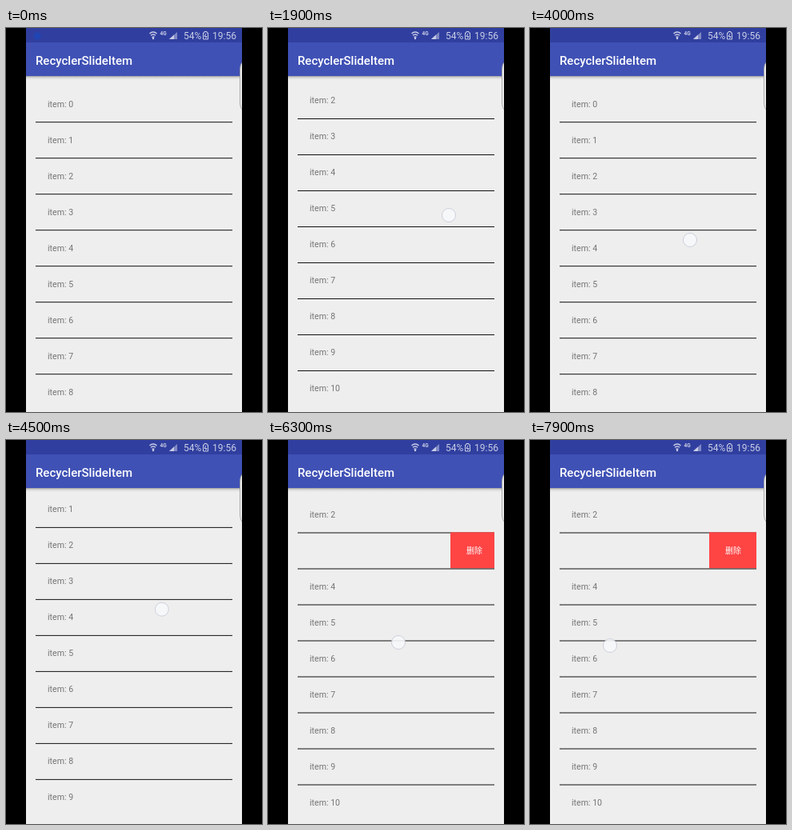
These frames come from a looping animation (320x480 px, 8 s). An HTML page:

```html
<!DOCTYPE html>
<html lang="en">
<head>
<meta charset="utf-8">
<title>Sliding list items</title>
<style>
html, body { margin: 0; width: 100%; height: 100%; overflow: hidden; background: #000; }
svg { display: block; width: 320px; height: 480px; }
text { font-family: Roboto, sans-serif; }
.label { font-size: 10.6px; fill: #757575; }
.status { font-size: 12px; fill: #c9cde6; }
.network { font-size: 6.5px; font-weight: 700; }
.delete { font: 10px "Noto Sans CJK SC", "Noto Sans CJK", sans-serif; fill: #fff; text-anchor: middle; }
</style>
</head>
<body>
<svg viewBox="0 0 320 480">
  <defs>
    <clipPath id="listClip"><rect x="37" y="72" width="246" height="396"/></clipPath>
    <clipPath id="screenClip"><rect x="25" width="270" height="480"/></clipPath>
    <linearGradient id="shade" x2="0" y2="1">
      <stop stop-color="#777" stop-opacity=".7"/>
      <stop offset=".4" stop-color="#999" stop-opacity=".3"/>
      <stop offset="1" stop-color="#bbb" stop-opacity="0"/>
    </linearGradient>
  </defs>
  <rect width="320" height="480"/>
  <g id="screen" clip-path="url(#screenClip)">
    <rect x="25" width="270" height="480" fill="#eee"/>
    <g clip-path="url(#listClip)"><g id="list"></g></g>

    <rect x="25" y="60" width="270" height="5" fill="url(#shade)"/>
    <rect x="25" y="18" width="270" height="42" fill="#3f51b5"/>
    <rect x="25" width="270" height="18" fill="#303f9f"/>
    <text x="37" y="46" font-size="15" font-weight="500" fill="#fff">RecyclerSlideItem</text>

    <circle id="notice" cx="39" cy="10" r="4.5" fill="#2146b4"/>
    <path d="M179.5 7q4.500-4 9 0M181 9.300q3-2.600 6 0M182.500 11.500q1.500-1.200 3 0" fill="none" stroke="#c9cde6" stroke-width="1.5"/>
    <circle cx="184" cy="13" r="1.2" fill="#c9cde6"/>
    <text class="status network" x="192.500" y="8.500">4G</text>
    <path d="M204 14L214 5V14Z" fill="#8089c4"/>
    <path d="M204 14L210 8.600V14Z" fill="#c9cde6"/>
    <text class="status" x="222" y="14">54%</text>
    <path d="M246.500 6H248V4.500H251V6H252.500V14H246.500ZM250 7L248 10.500H251L249.500 13" fill="none" stroke="#c9cde6"/>
    <text class="status" x="258" y="14">19:56</text>

    <path d="M296 42Q292.500 45 292.500 52V94Q292.500 100 296 103Z" fill="#eee" stroke="#999" stroke-width=".8"/>
  </g>
</svg>
<script>
const LOOP = 8000, STEP = 100, FADE = 200;
const ROW = 45, TOP = 72, RIGHT = 283, BUTTON = 60, SLIDING = 3;

// The list scrolls and the row slides by as much as the finger moves.
const gestures = [
  { start: 400, end: 1200, from: [222, 340], move: [0, -94.2], scrolls: true },
  { start: 1900, end: 2600, from: [226, 234], move: [-4, 94.2], scrolls: true },
  { start: 2940, end: 3300, from: [215, 146], move: [-2, 15] },
  { start: 4000, end: 4860, from: [200, 265], move: [-9, -91.7], scrolls: true },
  { start: 4900, end: 5300, from: [218, 152], move: [-BUTTON, 6], slides: true },
  { start: 6200, end: 6840, from: [158, 253], move: [32, 0], slides: true, springsBack: true },
  { start: 7880, end: 8520, from: [99, 257], move: [32, 0], slides: true }
];

const ramp = (time, start, end) => Math.min(1, Math.max(0, (time - start) / (end - start)));
const byId = id => document.getElementById(id);
const screen = byId("screen"), list = byId("list"), notice = byId("notice");

function add(parent, tag, attributes, content = "") {
  const node = document.createElementNS("http://www.w3.org/2000/svg", tag);
  for (const name in attributes) node.setAttribute(name, attributes[name]);
  node.textContent = content;
  return parent.appendChild(node);
}

const place = (node, x, y) => node.setAttribute("transform", `translate(${x} ${y})`);

let slidingLabel, deleteButton;
for (let i = 0; i < 13; i++) {
  const y = TOP + i * ROW, baseline = y + 26.7;
  const label = add(list, "text", { class: "label", x: 52, y: baseline }, "item: " + i);
  if (i === SLIDING) {
    slidingLabel = label;
    deleteButton = add(list, "g", {});
    add(deleteButton, "rect", { x: RIGHT, y, width: BUTTON, height: ROW, fill: "#f44" });
    add(deleteButton, "text", { class: "delete", x: RIGHT + BUTTON / 2, y: baseline }, "删除");
  }
  add(list, "rect", { x: 37, y: y + 45.2, width: 246, height: 1, fill: "#111" });
}

for (const gesture of gestures) {
  gesture.dot = add(screen, "circle", { r: 8.5, fill: "#f7f8fb", stroke: "#c9ccd8" });
}

function draw(time) {
  let scroll = 0, slide = 0;
  for (const { start, end, from, move, scrolls, slides, springsBack, dot } of gestures) {
    const part = ramp(time, start, end);
    const [dx, dy] = move.map(distance => distance * part);
    if (scrolls) scroll -= dy;
    if (slides) slide -= dx * (springsBack ? 1 - ramp(time, end, end + 300) : 1);
    place(dot, from[0] + dx, from[1] + dy);
    dot.setAttribute("opacity", .9 * ramp(time, start - FADE, start) * (1 - ramp(time, end, end + FADE)));
  }
  place(list, 0, -scroll);
  place(slidingLabel, -slide, 0);
  place(deleteButton, -slide, 0);
  notice.setAttribute("opacity", 1 - ramp(time, 0, 200));
}

const startTime = performance.now();
function tick() {
  const elapsed = (performance.now() - startTime) % LOOP;
  draw(Math.floor(elapsed / STEP) * STEP);
  requestAnimationFrame(tick);
}
tick();
</script>
</body>
</html>
```
